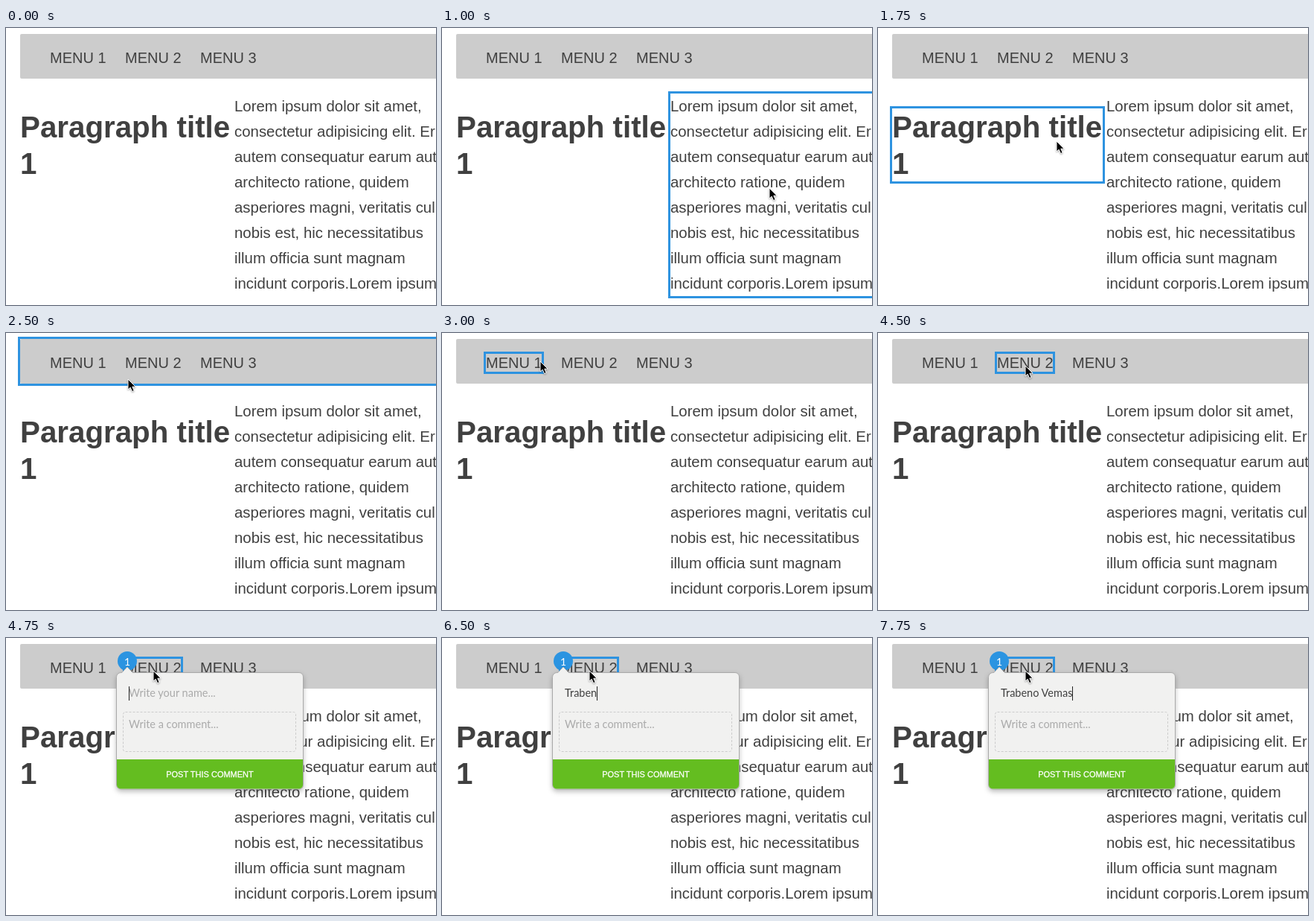
Recreate the animation shown at these times as an HTML page. Size 578 px wide and 372 px high, loop 8000 ms.

```html
<!DOCTYPE html>
<html lang="en">
<head>
<meta charset="utf-8">
<title>Comment on an element</title>
<style>
  html, body { margin: 0; width: 100%; height: 100%; overflow: hidden; background: #fff; }
  svg { display: block; width: 578px; height: 372px; }
  text { font-family: "Liberation Sans", Arial, sans-serif; fill: #404040; white-space: pre; }
  .menu { font-size: 20px; }
  .title { font-size: 40.3px; font-weight: bold; }
  .body { font-size: 20.4px; }
  .field { font: 14.5px Lato, sans-serif; }
  .hint { fill: #aaa; }
  .post { font-size: 11px; fill: #fff; stroke: #fff; stroke-width: .3px; text-anchor: middle; }
  .count { font: 14px Lato, sans-serif; fill: #fff; text-anchor: middle; }
  #focus { fill: none; stroke: #2e93e0; stroke-width: 3; }
  #popup { filter: drop-shadow(0 3px 3px rgba(0, 0, 0, .25)); }
  #cursor { filter: drop-shadow(0 1px 1px rgba(0, 0, 0, .35)); }
</style>
</head>
<body>
<svg viewBox="0 0 578 372">
  <rect x="19" y="8" width="600" height="60" rx="2" fill="#ccc"/>
  <g id="page"></g>
  <rect id="focus"/>
  <g id="badge">
    <circle cx="163" cy="31" r="13" fill="#2b94e1"/>
    <text class="count" x="163" y="37">1</text>
  </g>
  <g id="popup">
    <path d="M154.5 46.5H156L163 39L170 46.5H394a5.5 5.5 0 0 1 5.5 5.5V197.5a5.5 5.5 0 0 1 -5.5 5.5H154.5a6 6 0 0 1 -6 -6V52.5a6 6 0 0 1 6 -6Z" fill="#f1f1f0" stroke="#aaa"/>
    <path d="M156 47L163 39.5L170 47Z" fill="#f1f1f0"/>
    <path d="M149 163H399V197.5a5 5 0 0 1 -5 5H154a5 5 0 0 1 -5 -5Z" fill="#64bd20"/>
    <rect x="157.5" y="99.5" width="232" height="53" rx="3" fill="none" stroke="#ccc" stroke-dasharray="3 2"/>
    <text class="field hint" id="hint" x="165" y="79">Write your name...</text>
    <text class="field" id="name" x="165" y="79"></text>
    <text class="field hint" x="165" y="121">Write a comment...</text>
    <text class="post" x="274" y="187">POST THIS COMMENT</text>
    <rect id="caret" y="65" width="1" height="19" fill="#222"/>
  </g>
  <path id="cursor" d="M0 0V14L3.2 11.2L5.6 16.6L8.2 15.5L5.8 10.2H10.2Z" fill="#000" stroke="#fff" stroke-width="1"/>
</svg>
<script>
const LOOP = 8000, STEP = 250, POPUP_AT = 4750, TYPE_AT = 5750;
const NAME = "Trabeno Vemas";
const $ = id => document.getElementById(id);

// outer edges of each element's outline: x, y, width, height
const boxes = {
  para: [304, 85, 400, 278],
  title: [16, 105, 289, 104],
  bar: [16, 5, 620, 66],
  menu1: [56, 25, 81, 30],
  menu2: [157, 25, 81, 30]
};

// time, pointer x, pointer y, outlined element
const moves = [
  [500, 548, 262, "para"],
  [750, 500, 240, "para"],
  [1000, 440, 215, "para"],
  [1250, 380, 190, "para"],
  [1500, 318, 168, "para"],
  [1750, 240, 152, "title"],
  [2000, 216, 138, "title"],
  [2250, 190, 112, "title"],
  [2500, 164, 62, "bar"],
  [2750, 146, 48, "bar"],
  [3000, 132, 38, "menu1"],
  [3250, 137, 47, "menu1"],
  [3500, 150, 57, "bar"],
  [3750, 174, 56, "bar"],
  [4000, 192, 48, "menu2"],
  [4250, 197, 45, "menu2"],
  [4500, 198, 44, "menu2"]
];

// time, letters typed
const typing = [
  [TYPE_AT, 1], [6000, 3], [6250, 4], [6500, 6], [6750, 7],
  [7000, 9], [7250, 10], [7500, 11], [7750, 13]
];

const paragraph = [
  "Lorem ipsum dolor sit amet,",
  "consectetur adipisicing elit. Error",
  "autem consequatur earum aut",
  "architecto ratione, quidem",
  "asperiores magni, veritatis culpa",
  "nobis est, hic necessitatibus",
  "illum officia sunt magnam",
  "incidunt corporis.Lorem ipsum"
];

function addText(cls, x, y, str) {
  const el = document.createElementNS("http://www.w3.org/2000/svg", "text");
  el.setAttribute("class", cls);
  el.setAttribute("x", x);
  el.setAttribute("y", y);
  el.textContent = str;
  $("page").append(el);
}

[1, 2, 3].forEach(n => addText("menu", 59 + 101 * (n - 1), 47, "MENU " + n));
["Paragraph title", "1"].forEach((s, i) => addText("title", 19, 147 + 49 * i, s));
paragraph.forEach((s, i) => addText("body", 307, 112 + 34 * i, s));

const current = (rows, t) => rows.filter(row => row[0] <= t).pop();
const show = (id, on) => $(id).setAttribute("visibility", on ? "inherit" : "hidden");

function drawPointer(t) {
  const move = current(moves, t);
  show("cursor", move);
  show("focus", move);
  if (!move) return;
  const [, px, py, target] = move;
  const [x, y, w, h] = boxes[target];
  $("cursor").setAttribute("transform", `translate(${px} ${py})`);
  const edges = { x: x + 1.5, y: y + 1.5, width: w - 3, height: h - 3 };
  for (const key in edges) $("focus").setAttribute(key, edges[key]);
}

function drawPopup(t) {
  const open = t >= POPUP_AT;
  $("popup").setAttribute("visibility", open ? "visible" : "hidden");
  $("badge").setAttribute("visibility", open ? "visible" : "hidden");
  const typed = current(typing, t);
  $("name").textContent = typed ? NAME.slice(0, typed[1]) : "";
  show("hint", !typed);
  show("caret", t < 5250 || t >= TYPE_AT);
  const end = typed ? $("name").getComputedTextLength() : 0;
  $("caret").setAttribute("x", Math.round(165 + end));
}

function frame() {
  const t = Math.floor(performance.now() % LOOP / STEP) * STEP;
  drawPointer(t);
  drawPopup(t);
  requestAnimationFrame(frame);
}
frame();
</script>
</body>
</html>
```
